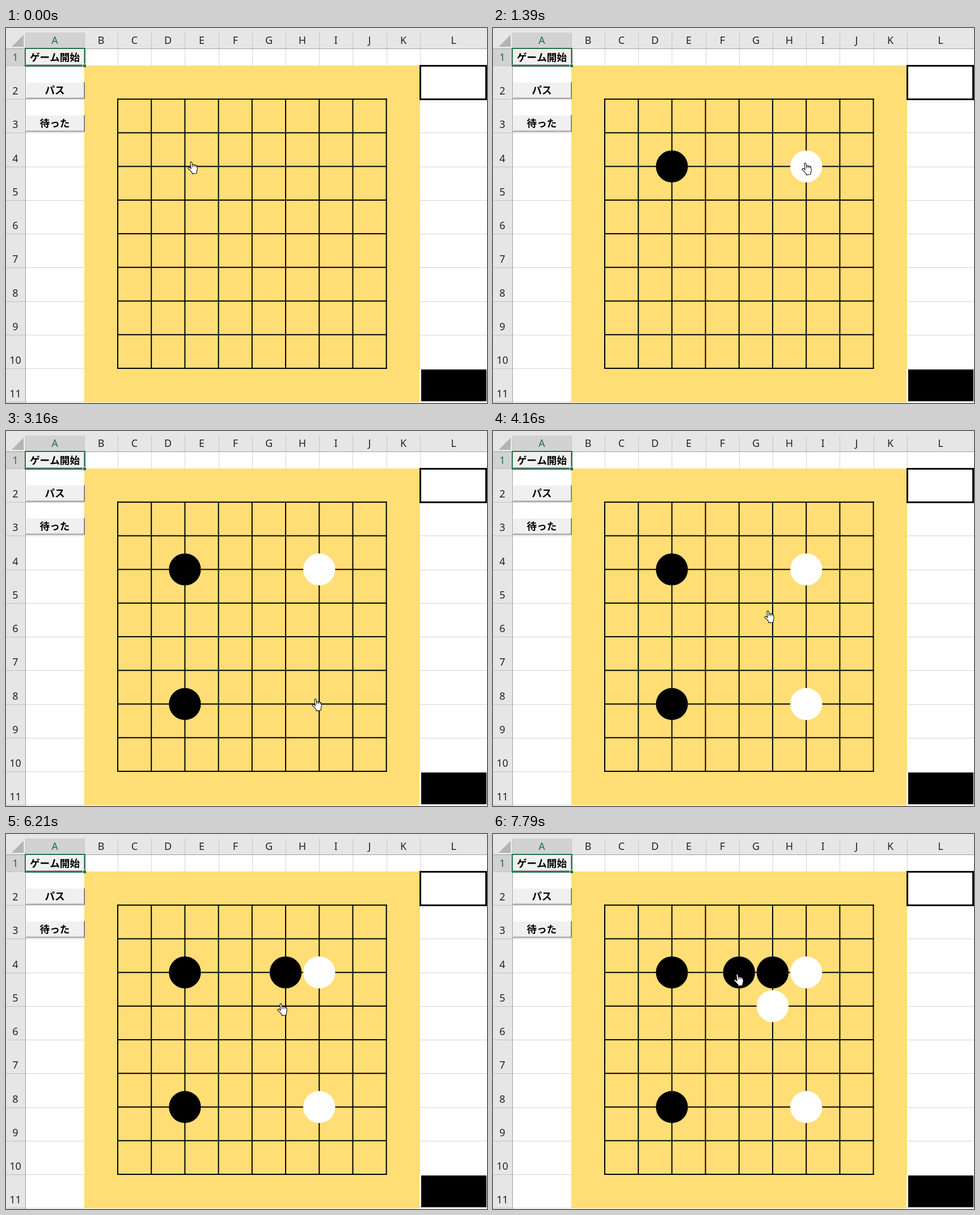
An HTML page with a canvas that plays this animation: 848 by 660 pixels, repeating every 8000 ms.

```html
<!DOCTYPE html>
<html lang="ja">
<head>
<meta charset="utf-8">
<style>
  html, body { margin: 0; width: 100%; height: 100%; overflow: hidden; background: #fff; }
  canvas { display: block; }
</style>
</head>
<body>
<canvas id="stage" width="848" height="660"></canvas>
<script>
const W = 848, H = 660, LOOP = 8000;
const LABEL = '300 18px "Noto Sans", "Noto Sans CJK JP", sans-serif';
const CAPTION = 'bold 17.6px "Noto Sans CJK JP", "Noto Sans CJK", sans-serif';
const GREEN = '#217346', HEAD = '#e6e6e6', PICKED = '#d2d2d2', GRID = '#d4d4d4', WOOD = '#ffde76';

const lineX = i => 197 + 59.2 * i;
const lineY = i => 125.2 + 59.22 * i;
const rowEnd = r => r === 1 ? 66 : Math.round(lineY(r - 2));
const colStart = c => c === 0 ? 34 : c === 12 ? W : Math.round(lineX(c - 2));

const stones = [
  { at: 120, col: 2, row: 2, color: '#000' },
  { at: 1320, col: 6, row: 2, color: '#fff' },
  { at: 2400, col: 2, row: 6, color: '#000' },
  { at: 3480, col: 6, row: 6, color: '#fff' },
  { at: 5100, col: 5, row: 2, color: '#000' },
  { at: 6340, col: 5, row: 3, color: '#fff' },
  { at: 7660, col: 4, row: 2, color: '#000' }
];

// each move eases from wherever the pointer rests; lift bows the path upward
const home = { x: 320, y: 235 };
const moves = [
  { from: 120, to: 700, x: 577, y: 237 },
  { from: 850, to: 1070, x: 544, y: 237 },
  { from: 1380, to: 2220, x: 316, y: 479 },
  { from: 2610, to: 3220, x: 545, y: 472, lift: 18 },
  { from: 3820, to: 4360, x: 448, y: 247 },
  { from: 4750, to: 5040, x: 484, y: 241 },
  { from: 5750, to: 6210, x: 478, y: 298 },
  { from: 6800, to: 7600, x: 424, y: 246 }
];

function painter(g) {
  return {
    rect(color, x, y, w, h) {
      g.fillStyle = color;
      g.fillRect(x, y, w, h);
    },
    text(str, x, y, color, font) {
      g.fillStyle = color;
      g.font = font;
      g.textAlign = 'center';
      g.fillText(str, x, y);
    }
  };
}

function drawButton({ rect, text }, label, y, h) {
  rect('#696969', 35, y, 104, h);
  rect('#fff', 35, y, 103, h - 1);
  rect('#a0a0a0', 36, y + 1, 102, h - 2);
  rect('#f0f0f0', 36, y + 1, 101, h - 3);
  text(label, 86, y + h / 2 + 6, '#000', CAPTION);
}

function drawHeadings({ rect, text }) {
  rect(HEAD, 0, 0, W, 36);
  rect(HEAD, 0, 36, 34, H);
  rect(PICKED, 35, 8, 104, 28);
  rect(PICKED, 0, 37, 34, 29);
  for (let c = 0; c < 12; c++) {
    const left = colStart(c), mid = (left + colStart(c + 1)) / 2;
    rect('#c6c6c6', left, 8, 1, 28);
    text(String.fromCharCode(65 + c), mid, 28, c ? '#222' : GREEN, LABEL);
  }
  for (let r = 1; r <= 11; r++) {
    rect('#c0c0c0', 0, rowEnd(r), 34, 1);
    text(r, 16.5, rowEnd(r) - 8.5, r > 1 ? '#222' : GREEN, LABEL);
  }
  rect('#9f9f9f', 0, 36, W, 1);
  rect('#9f9f9f', 34, 36, 1, H);
}

function drawSheet(g) {
  const p = painter(g), { rect } = p;
  rect('#fff', 0, 0, W, H);
  for (let r = 1; r <= 11; r++) rect(GRID, 35, rowEnd(r), W, 1);
  for (let c = 1; c < 12; c++) rect(GRID, colStart(c), 37, 1, 30);

  drawHeadings(p);
  g.fillStyle = '#b4b4b4';
  g.fill(new Path2D('M31 12V33H10Z'));

  // board
  rect(WOOD, 138, 66, 592, 593);
  for (let i = 0; i < 9; i++) {
    rect('#000', lineX(i) - 1, 124.2, 2, 475.8);
    rect('#000', 196, lineY(i) - 1, 475.6, 2);
  }

  // side cells
  g.strokeStyle = '#000';
  g.lineWidth = 3;
  rect('#fff', 730, 66, 118, 60);
  g.strokeRect(730.5, 66.5, 116, 59);
  rect('#fff', 729, 599, 119, 61);
  rect('#000', 732, 601, 115, 56);

  drawButton(p, 'ゲーム開始', 37, 29);
  drawButton(p, 'パス', 95, 29.6);
  drawButton(p, '待った', 153, 29.6);

  // selected cell
  g.strokeStyle = GREEN;
  g.lineWidth = 2;
  g.strokeRect(34, 36, 105, 31);
  rect('#fff', 135, 63, 6, 6);
  rect(GREEN, 136, 64, 5, 5);
}

const hand = new Path2D(
  'M5.5 13V1.5L6.5.5H7.5L8.5 1.5V5.5H10.5L11.5 6.5H13.5L14.5 7.5H15.5L16.5 9V14.5' +
  'L15.5 16V18L14.5 19V21.5H6.5V19L4.5 16.5L3.5 14.5L.5 11.5V10.5L1.5 9.5H3L5.5 12Z'
);
const fingers = new Path2D('M8.5 5.5V10M11.5 6.5V10M14.5 8V10.5');

function drawHand(g, { x, y }) {
  g.save();
  g.translate(Math.round(x) + 8.5, Math.round(y) + 11);
  g.rotate(-0.12);
  g.translate(-8, -11);
  g.fillStyle = '#fff';
  g.strokeStyle = '#000';
  g.lineWidth = 1;
  g.fill(hand);
  g.stroke(hand);
  g.stroke(fingers);
  g.restore();
}

const clamp = u => Math.min(1, Math.max(0, u));
const ease = u => u * u * (3 - 2 * u);

function pointerAt(t) {
  let { x, y } = home;
  for (const m of moves) {
    const u = ease(clamp((t - m.from) / (m.to - m.from)));
    x += (m.x - x) * u;
    y += (m.y - y) * u - (m.lift || 0) * Math.sin(Math.PI * u);
  }
  return { x, y };
}

const sheet = document.createElement('canvas');
sheet.width = W;
sheet.height = H;
drawSheet(sheet.getContext('2d'));
const ctx = document.getElementById('stage').getContext('2d');

function draw(t) {
  ctx.drawImage(sheet, 0, 0);
  for (const { at, col, row, color } of stones) {
    if (t < at) continue;
    ctx.fillStyle = color;
    ctx.beginPath();
    ctx.arc(lineX(col), lineY(row), 28.2, 0, Math.PI * 2);
    ctx.fill();
  }
  drawHand(ctx, pointerAt(t));
}

function tick() {
  draw(performance.now() % LOOP);
  requestAnimationFrame(tick);
}
tick();
</script>
</body>
</html>
```
